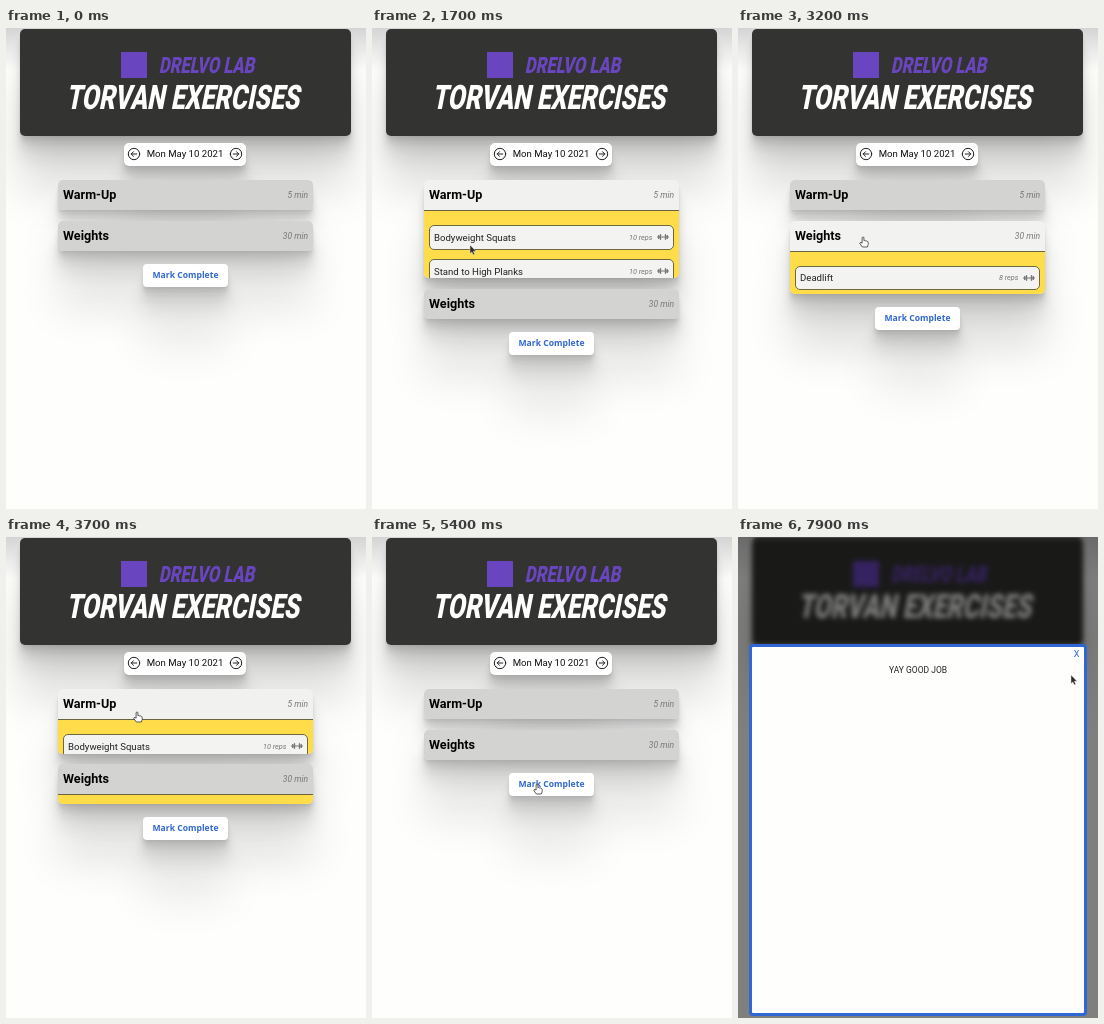
These frames come from a looping animation (360 by 481 pixels, 8 s). An HTML page:

```html
<!DOCTYPE html>
<html lang="en">
<head>
<meta charset="utf-8">
<title>Workout planner</title>
<style>
  :root {
    --loop: 8s infinite;
    --shadow: 0 1.5px 1.2px rgba(0,0,0,.034), 0 3.7px 2.9px rgba(0,0,0,.048),
      0 6.9px 5.5px rgba(0,0,0,.06), 0 12.3px 9.8px rgba(0,0,0,.072),
      0 23px 18.4px rgba(0,0,0,.086), 0 55px 44px rgba(0,0,0,.12);
  }
  * { box-sizing: border-box; }
  html, body { margin: 0; width: 100%; height: 100%; overflow: hidden; }
  body { background: #fefefd; font-family: Roboto, sans-serif; color: #111; }
  .stage { position: absolute; inset: 0; width: 360px; height: 481px; overflow: hidden; }
  .stage > * { position: absolute; }
  .sky { inset: 0 0 auto; height: 42px; background: linear-gradient(#d4d4d4, #d4d4d400); }

  .banner { left: 14px; top: 1px; width: 331px; height: 107px; border-radius: 5px;
    background: #333331; box-shadow: var(--shadow); }
  .banner svg { position: absolute; left: -14px; top: -1px; }
  .banner text { font-weight: 900; text-anchor: middle; }

  .date { left: 118px; top: 115px; width: 122px; height: 23px; border-radius: 5px;
    background: #fff; box-shadow: var(--shadow); font-size: 9.6px; line-height: 22px; text-align: center; }
  .date svg { position: absolute; top: 3.5px; width: 14px; height: 14px; }
  .date svg:first-child { left: 3px; }
  .date svg:last-child { right: 3px; transform: scaleX(-1); }

  .plan { left: 52px; top: 152px; width: 255px; }
  .card { border-radius: 5px; overflow: hidden; margin-bottom: 10.6px; box-shadow: var(--shadow); }
  .head { display: flex; justify-content: space-between; height: 30px; padding: 0 5px;
    line-height: 30px; background: #d3d3d1; }
  .head b { font-size: 12.6px; color: #000; }
  .head i { font-size: 8.5px; color: #777; }
  .body { height: 0; overflow: hidden; background: linear-gradient(#6a633f 1px, #ffdc4a 1px); }
  .list { padding: 15px 5px 0; }
  .item { display: flex; align-items: center; height: 24.5px; margin-bottom: 9.7px; padding: 0 4px;
    border: 1px solid #6f683f; border-radius: 5px; background: #f3f3f1; font-size: 9.6px; color: #222; }
  .item i { margin-left: auto; font-size: 7.3px; color: #777; }
  .item svg { width: 12px; height: 10px; margin-left: 4.5px; }
  .done { width: 85px; height: 23px; margin: 13.5px 0 0 85px; border-radius: 4px; background: #fff;
    box-shadow: var(--shadow); font: 600 8.6px/23px "Noto Sans", sans-serif; color: #3268cf; text-align: center; }

  .veil { inset: 0; background: rgba(0,0,0,.5); backdrop-filter: blur(2.5px); animation: show var(--loop); }
  .modal { left: 11px; top: 107px; width: 338px; height: 372px; border: 3px solid #2f67d4; border-radius: 4px;
    background: #fefefd; font-size: 8.5px; text-align: center; animation: show var(--loop); }
  .modal span { position: absolute; left: 0; right: 0; top: 18px; line-height: 10px; color: #222; }
  .modal b { position: absolute; right: 4.5px; top: 2px; font-weight: 400; font-size: 9px; line-height: 10px; color: #2f67d4; }

  .cursor { left: 0; top: 0; width: 14px; height: 16px; overflow: visible; animation: roam var(--loop); }
  .arrow { animation: arrow var(--loop) step-end; }
  .hand { animation: hand var(--loop) step-end; }

  .warm .head { animation: warm-tint var(--loop) linear; }
  .warm .body { animation: warm-open var(--loop) ease-out; }
  .weights .head { animation: weights-tint var(--loop) linear; }
  .weights .body { animation: weights-open var(--loop) linear; }

  @keyframes warm-tint {
    0%, 2% { background: #d3d3d1; }
    4%, 24% { background: #f1f1ef; }
    27.5%, 42% { background: #d3d3d1; }
    44%, 58.5% { background: #f1f1ef; }
    60.5%, 100% { background: #d3d3d1; }
  }
  @keyframes warm-open {
    0%, 8% { height: 0; }
    18.75% { height: 63px; }
    21.25%, 22.5% { height: 68px; animation-timing-function: ease-in-out; }
    28.75%, 41.9% { height: 0; animation-timing-function: linear; }
    46.25% { height: 34.5px; }
    49.4% { height: 52px; animation-timing-function: linear; }
    52.5% { height: 20px; }
    56.25% { height: 6px; }
    58.2%, 100% { height: 0; }
  }
  @keyframes weights-tint {
    0%, 25.5% { background: #d3d3d1; }
    28%, 42% { background: #f2f2f0; }
    44%, 100% { background: #d3d3d1; }
  }
  @keyframes weights-open {
    0%, 27% { height: 0; }
    31.25% { height: 34.5px; animation-timing-function: ease-out; }
    34.5%, 41.9% { height: 43px; }
    46.25% { height: 9.5px; }
    48.2%, 100% { height: 0; }
  }
  @keyframes show {
    0%, 67.5% { opacity: 0; }
    75%, 100% { opacity: 1; }
  }
  @keyframes roam {
    0%, 1.25% { transform: translate(118px, 202px); }
    5%, 12% { transform: translate(103px, 172px); }
    20.5%, 22.5% { transform: translate(98px, 217px); }
    27% { transform: translate(124px, 208px); }
    31.25%, 40% { transform: translate(125px, 209px); }
    44%, 52.5% { transform: translate(131px, 175px); }
    56.25%, 57.5% { transform: translate(130px, 184px); }
    63.75%, 68.75% { transform: translate(165px, 247px); }
    75%, 78.75% { transform: translate(78px, 296px); }
    89.5% { transform: translate(326px, 148px); }
    92.5%, 95% { transform: translate(337px, 114px); }
    98.1%, 100% { transform: translate(333px, 138px); }
  }
  @keyframes arrow {
    0% { opacity: 0; } 1.25% { opacity: 1; }
    3% { opacity: 0; } 17% { opacity: 1; }
    26% { opacity: 0; } 42% { opacity: 1; }
    43% { opacity: 0; } 54.5% { opacity: 1; }
    62.5% { opacity: 0; } 70% { opacity: 1; }
    92% { opacity: 0; } 95.6%, 100% { opacity: 1; }
  }
  @keyframes hand {
    0% { opacity: 0; } 3% { opacity: 1; }
    17% { opacity: 0; } 26% { opacity: 1; }
    42% { opacity: 0; } 43% { opacity: 1; }
    54.5% { opacity: 0; } 62.5% { opacity: 1; }
    70% { opacity: 0; } 92% { opacity: 1; }
    95.6%, 100% { opacity: 0; }
  }
</style>
</head>
<body>
<svg width="0" height="0" style="position:absolute">
  <symbol id="back" viewBox="0 0 14 14">
    <g fill="none" stroke="#222" stroke-linecap="round" stroke-linejoin="round">
      <circle cx="7" cy="7" r="5.7"/><path d="M9.8 7H4.2M6.5 4.7 4.2 7 6.5 9.3"/>
    </g>
  </symbol>
  <symbol id="bell" viewBox="0 0 12 10">
    <path d="M0 5H12" stroke="#777"/>
    <path d="M1.7 3.6V6.4M10.3 3.6V6.4M3.5 2.7V7.3M8.5 2.7V7.3" stroke="#777" stroke-width="1.4" stroke-linecap="round"/>
  </symbol>
</svg>

<div class="stage">
  <div class="sky"></div>
  <div class="banner">
    <svg width="360" height="108">
      <rect x="115" y="24" width="26" height="26" fill="#6a45c0"/>
      <text transform="translate(200.5 45) skewX(-11) scale(.735 1)" font-size="22.5" fill="#6a45c0">DRELVO LAB</text>
      <text transform="translate(176.5 81) skewX(-11) scale(.735 1)" font-size="33.8" fill="#fefefd">TORVAN EXERCISES</text>
    </svg>
  </div>

  <div class="date"><svg><use href="#back"/></svg>Mon May 10 2021<svg><use href="#back"/></svg></div>

  <div class="plan">
    <div class="card warm">
      <div class="head"><b>Warm-Up</b><i>5 min</i></div>
      <div class="body"><div class="list">
        <div class="item">Bodyweight Squats<i>10 reps</i><svg><use href="#bell"/></svg></div>
        <div class="item">Stand to High Planks<i>10 reps</i><svg><use href="#bell"/></svg></div>
      </div></div>
    </div>
    <div class="card weights">
      <div class="head"><b>Weights</b><i>30 min</i></div>
      <div class="body"><div class="list">
        <div class="item">Deadlift<i>8 reps</i><svg><use href="#bell"/></svg></div>
      </div></div>
    </div>
    <div class="done">Mark Complete</div>
  </div>

  <div class="veil"></div>
  <div class="modal"><b>X</b><span>YAY GOOD JOB</span></div>

  <svg class="cursor">
    <path class="arrow" d="M0 0V8.6L1.9 6.9 3.2 9.8 4.7 9.2 3.4 6.3H6Z" fill="#2b2b2b" stroke="#ddd" stroke-width=".5"/>
    <path class="hand" d="M-.9 6.2V1Q-.9 0 0 0T.9 1V3.6Q2 3 2.6 4 3.6 3.6 4.1 4.5 5.2 4.3 5.2 5.6V7.6L4.3 10H-.6L-3.2 6.6Q-3.2 5.3-2 5.5Z"
      fill="#fff" stroke="#333" stroke-width=".8" stroke-linejoin="round"/>
  </svg>
</div>
</body>
</html>
```
